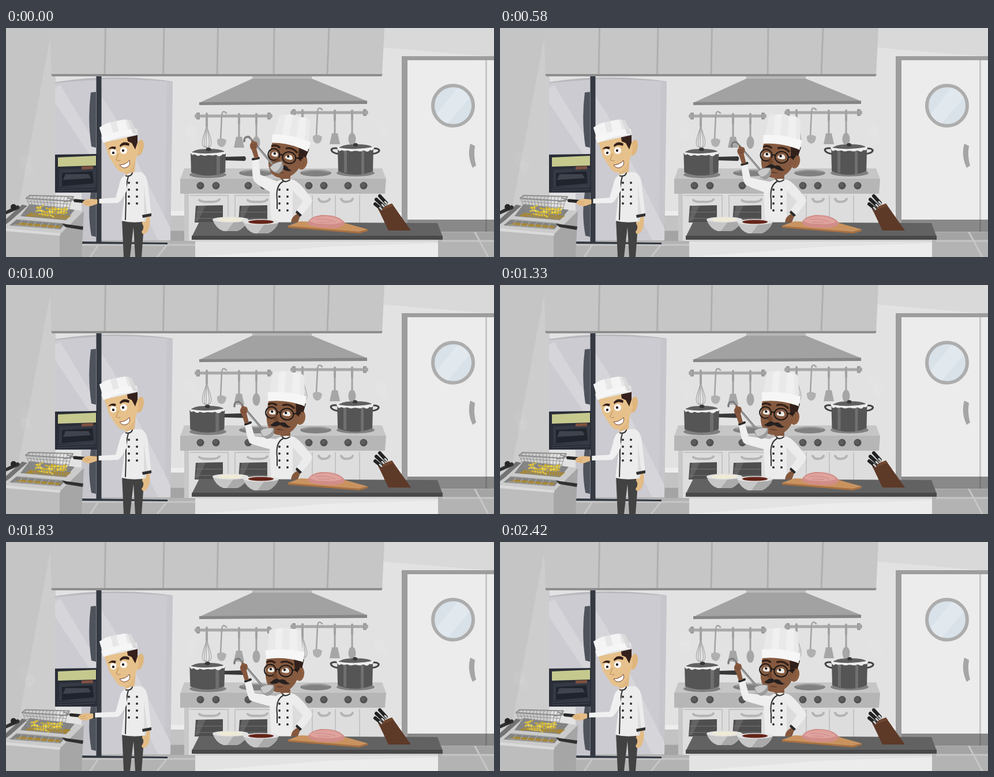
An HTML page for the animation above (2510 ms loop, 846 by 398 pixels).

```html
<!DOCTYPE html>
<html lang="en">
<head>
<meta charset="utf-8">
<title>Kitchen</title>
<style>
html, body { margin: 0; width: 100%; height: 100%; overflow: hidden; background: #e2e2e2; }
svg { display: block; width: 100%; height: 100%; }
.line { fill: none; stroke-linecap: round; stroke-linejoin: round; }
</style>
</head>
<body>
<svg viewBox="0 0 846 398" preserveAspectRatio="none">
  <!-- walls and floor -->
  <path fill="#e2e2e2" d="M0 0H846V398H0z"/>
  <path fill="#d9d9d9" d="M640 0H846V50L655 34z"/>
  <path fill="#c5c5c5" d="M0 0H86V330H0z"/>
  <path fill="#cdcdcd" d="M76 20L86 84V330H18z"/>
  <path fill="#ededed" d="M286 318H309V326H286zM655 320H688V332H655z"/>
  <path fill="#b3b3b3" d="M0 372H130L284 326H312V354H846V398H0z"/>
  <path fill="#c3c3c3" d="M286 326H309V352H286zM655 332H688V354H655z"/>
  <path fill="#a4a4a4" d="M284 353H312V370H284zM748 355H846V369H757z"/>
  <g class="line" stroke="#c6c6c6" stroke-width="3">
    <path d="M813 355L836 398M757 370H846M130 377H328M279 377L262 398M160 377L146 398"/>
  </g>

  <!-- door -->
  <path fill="#9d9d9d" d="M686 49H846V354H686z"/>
  <path fill="#ececec" d="M696 56H846V333H696z"/>
  <path fill="#898989" d="M696 333H846V354H696z"/>
  <path fill="#c7c7c7" d="M831 56H834V333H831z"/>
  <path fill="#777" d="M831 333H834V354H831z"/>
  <circle cx="775" cy="135" r="35" fill="#d9e2e9" stroke="#adadad" stroke-width="6"/>
  <path fill="#e1e8ee" d="M747 148L783 104Q797 108 804 121L766 166Q750 160 747 148z"/>
  <path fill="#a5a5a5" d="M805 201L813 205Q810 222 815 239L809 243Q799 222 805 201z"/>

  <!-- fridge -->
  <path fill="#b9b9be" d="M85 94Q185 78 289 93L284 110H85z"/>
  <path fill="#cccbd1" d="M85 96Q120 92 158 90V373H131V287H85z"/>
  <path fill="#cccbd1" d="M165 89Q230 88 289 94L285 369H165z"/>
  <path fill="#c7c6cc" d="M279 94L289 94L285 369H275z"/>
  <path fill="#d6d5da" d="M85 104L94 99L158 205V240L85 130zM165 118L186 150L285 348V369H264L165 171z"/>
  <path fill="#c6c5cc" d="M131 287H158V373H131z"/>
  <path fill="#343942" d="M156.500 84H165.500V374H156.500zM131 371L280 373V376L131 375z"/>
  <path fill="#4e535c" d="M147 112L156 111V208L148 206Q141 158 147 112zM147 286L156 285V363L148 361Q141 322 147 286z"/>
  <path fill="#2a2e38" d="M85 220L158 219V286H85z"/>
  <path fill="#c6c98e" d="M90 225L156 222V239L90 241z"/>
  <path fill="#343944" d="M92 246L156 243V276H92z"/>
  <path fill="#20242c" d="M97 252L150 249L152 270L97 275z"/>
  <path fill="#3f444f" d="M103 254H143L147 261L99 264z"/>
  <path fill="#81513f" d="M131 241L151 240V245L131 246z"/>
  <path class="line" stroke="#424752" d="M90 279L154 276M90 283L154 280"/>

  <!-- cabinets and hood -->
  <path fill="#c6c6c6" d="M76 0H656L652 82H79z"/>
  <path class="line" stroke="#afafaf" stroke-width="3" d="M172.500 0L171 81M274 0L272.500 81M367.500 0L366 81M465 0L464 81M560 0L557 81"/>
  <path fill="#8e8e8e" d="M78 80H653L651 84H80z"/>
  <path fill="#b9b9b9" d="M427 84H530V89H427z"/>
  <path fill="#a2a2a2" d="M427 88H530L626 127L335 130z"/>
  <path fill="#858585" d="M335 129L626 126.500V132L335 134z"/>

  <g id="tools"></g>

  <!-- stove -->
  <path fill="#c6c6c6" d="M309 244H652L659 263H302z"/>
  <path fill="#b6b6b6" d="M302 262H659L657 288H302z"/>
  <path fill="#dddddd" d="M309 288H653V370H309z"/>
  <path fill="#c8c8c8" d="M309 288H317V370H309z"/>
  <path class="line" stroke="#bcbcbc" stroke-width="1.500" d="M319 291H385V370M397 370V291H457M531 291V338M571 291V338M613 291V338"/>
  <path class="line" stroke="#b4b4b4" stroke-width="4" d="M335 299Q339 303 352 302Q367 303 370 298M419 299Q422 303 436 302Q450 303 453 298M542 297Q545 303 551 302Q559 302 561 297M581 297Q584 303 591 302Q599 302 601 297"/>
  <path fill="#4e4e4e" d="M329 309L376 308V338H327zM405 309L453 308V338H403z"/>
  <path fill="#626262" d="M333 309H346L333 336H328zM409 309H422L409 336H404z"/>
  <path class="line" stroke="#777" d="M329 320H376M329 331H376M405 320H453M405 331H453"/>
  <g fill="#808080"><ellipse cx="433" cy="252" rx="29" ry="6"/><ellipse cx="537" cy="252" rx="27" ry="6"/><ellipse cx="350" cy="255" rx="32" ry="6"/><ellipse cx="606" cy="252" rx="33" ry="6"/></g>
  <path class="line" stroke="#9f9f9f" stroke-width="2" d="M410 250Q433 244 456 250M515 250Q537 244 559 250"/>
  <g id="knobs"></g>

  <!-- pots -->
  <g id="pot1">
    <path fill="#383838" d="M378 224L414 223Q418 227 414 231L378 230z"/>
    <path fill="#555" d="M320 216H381L380 251Q350 262 321 251z"/>
    <path fill="#6e6e6e" d="M365 219H371V255L365 256z"/>
    <ellipse cx="350.500" cy="216" rx="31" ry="5" fill="#ededed"/>
    <path fill="#ededed" d="M320 216Q322 223 327 219Q332 225 338 220Q345 224 351 220Q358 223 364 220Q370 226 376 219Q381 221 381 215z"/>
    <path fill="#606060" d="M322 216Q329 210 350 210Q374 210 379 215Q350 221 322 216z"/>
    <ellipse cx="351" cy="211" rx="4.500" ry="3" fill="#383838"/>
  </g>
  <g id="pot2">
    <path class="line" stroke="#444" stroke-width="3" d="M577 219Q564 217 564 211Q568 207 578 210M634 219Q648 217 647 212Q643 208 633 210"/>
    <path fill="#555" d="M575 208H637L636 249Q606 261 576 249z"/>
    <path fill="#707070" d="M586 212H591V252L586 251zM616 212H621V254H616z"/>
    <ellipse cx="606" cy="208" rx="32" ry="5.500" fill="#ededed"/>
    <path fill="#ededed" d="M574 208Q577 217 582 212Q587 215 592 212Q599 217 606 212Q615 217 620 212Q627 218 631 212Q638 214 638 207z"/>
    <path fill="#606060" d="M577 208Q585 202 606 202Q630 202 635 207Q606 213 577 208z"/>
    <ellipse cx="606" cy="203" rx="4" ry="3" fill="#383838"/>
  </g>
  <g id="steam" fill="#fff"></g>

  <!-- tasting chef -->
  <path fill="#7f5339" d="M473 250H492L494 272L480 276z"/>
  <path fill="#ececec" d="M469 267Q483 259 499 264Q512 270 531 299Q530 307 512 326L503 318L515 301L502 288L501 340H460L457 286z"/>
  <path fill="#dcdcdc" d="M497 282L503 289V340H497z"/>
  <path fill="#85583e" d="M505 323Q495 327 494 338H506L510 327z"/>
  <path fill="#292929" d="M504 317L513 325L510 328L502 321z"/>
  <path class="line" stroke="#303030" stroke-width="2" d="M479 264Q484 270 492 264M480 267Q467 274 470 299V314"/>
  <g id="buttons2" fill="#303030"></g>
  <g id="head">
    <ellipse cx="507" cy="227" rx="8.500" ry="13" fill="#8c5e42"/>
    <path fill="#74492f" d="M505 219Q512 222 507 236Q511 230 509 222z"/>
    <path fill="#855a40" d="M449 201H511L505 233Q501 250 486 259Q470 265 459 257Q448 247 448 224z"/>
    <path fill="#32211b" d="M496 202H514L511 218Q506 214 504 226L499 223z"/>
    <path fill="#edebe6" d="M452 222Q455 218 460 219Q464 221 463 226Q457 229 452 226zM476 223Q480 218 486 219Q490 222 489 226Q483 229 476 226z"/>
    <circle cx="457" cy="222" r="2.200" fill="#1e1614"/><circle cx="481" cy="222" r="2.200" fill="#1e1614"/>
    <path class="line" stroke="#33211a" stroke-width="3.500" d="M450 210Q456 206 463 210M475 209Q485 205 494 212"/>
    <g class="line" stroke="#1b1919" stroke-width="2"><ellipse cx="456" cy="224" rx="10" ry="10"/><ellipse cx="483" cy="224" rx="11.500" ry="10"/><path d="M466 223Q469 220 471 223M495 222L506 220"/></g>
    <path fill="#70472f" d="M465 226L460 236Q465 240 470 236z"/>
    <path fill="#262020" d="M456 246Q460 243 463 240Q468 236 473 240Q481 237 485 242Q488 245 492 245Q485 250 473 244Q463 250 456 246z"/>
    <path fill="#5d392a" d="M466 252Q473 250 481 252Q474 254 466 252z"/>
    <path fill="#e9e9e9" d="M451 156Q455 150 465 152Q475 147 486 151Q499 148 506 155L511 192H449z"/>
    <path fill="#f0f0f0" d="M462 152Q468 150 474 150L475 190H463zM486 151L498 150L503 190H488z"/>
    <path fill="#f6f6f6" d="M446 190Q480 183 514 190L512 207Q480 198 448 205z"/>
  </g>
  <path id="sleeve" fill="#efefef"/>
  <path id="cuff" class="line" stroke="#292929" stroke-width="4"/>
  <g id="ladle">
    <path class="line" stroke="#7d7d7d" stroke-width="3.500" d="M396 211Q396 202 404 203L411 211L446 252"/>
    <path class="line" stroke="#c5c5c5" d="M398 207Q403 203 409 210L444 250"/>
    <g id="scoop">
      <path fill="#c9c9c9" stroke="#858585" d="M441 253Q450 246 464 249Q466 265 453 267Q443 264 441 253z"/>
      <path fill="#9c9c9c" d="M464 249Q466 265 453 267Q449 266 446 263Q459 262 464 249z"/>
    </g>
    <path fill="#85583e" d="M414 241L409 226Q403 219 408 213L409 208L412 211L417 212Q421 216 417 223L421 239z"/>
    <path class="line" stroke="#694330" d="M408 218L416 216M409 222L416 220"/>
  </g>

  <!-- island -->
  <path fill="#626262" d="M335 337L748 339L757 363H322z"/>
  <path fill="#494949" d="M322 361H757V368H322z"/>
  <path fill="#e3e3e3" d="M328 368H749V398H328z"/>
  <path fill="#d0d0d0" d="M328 368H749V371H328z"/>
  <path fill="#ececec" d="M328 398L560 380L749 374V398z"/>
  <g id="bowls"></g>
  <path fill="#a87042" d="M489 343L611 354L627 350V353L612 357L489 347z"/>
  <path fill="#c9935f" d="M489 344L510 336L588 339L627 350L611 354z"/>
  <path fill="#d18d88" d="M523 339Q526 328 546 325Q576 324 587 338Q588 346 567 348Q529 348 523 339z"/>
  <path fill="#dfa39e" d="M526 335Q537 326 557 327Q574 328 583 337Q570 343 549 340Q534 341 526 335z"/>
  <path class="line" stroke="#cd8983" d="M537 333Q550 330 571 337M541 337L561 338"/>
  <path fill="#5d3928" d="M645 314L669 305L702 352H663z"/>
  <path fill="#70462f" d="M645 314L669 305L672 309L647 319z"/>
  <g class="line" stroke-linecap="butt">
    <path stroke="#222" stroke-width="6" d="M640 306L650 314M642 298L654 309M648 292L659 304"/>
    <path stroke="#ccc" stroke-width="3" d="M648 312L651 315M652 307L655 310M657 302L660 305"/>
  </g>

  <!-- frying chef -->
  <path fill="#424242" d="M201 332H240L235 398H224L221 346L215 398H204z"/>
  <path fill="#e3bb85" d="M237 329L249 328Q251 344 245 354Q237 362 235 354Q241 347 236 340z"/>
  <path fill="#e0b983" d="M204 238L225 226L222 259L208 261z"/>
  <path fill="#ececec" d="M207 256Q219 249 235 251Q245 256 246 274L252 325L242 327V336Q220 340 200 335L206 287z"/>
  <path fill="#dcdcdc" d="M239 272L245 324L242 336L239 337z"/>
  <path fill="#303030" d="M236 325L252 322V327L237 330z"/>
  <path class="line" stroke="#303030" stroke-width="2" d="M207 257Q217 259 219 252M212 258Q207 276 208 300L207 333"/>
  <g id="buttons1" fill="#303030"></g>
  <ellipse cx="232" cy="208" rx="6.500" ry="14" transform="rotate(12 232 208)" fill="#dfb67d"/>
  <path fill="#e6c18b" d="M169 194L226 180L230 211Q225 236 211 249Q202 255 193 246L179 225z"/>
  <path fill="#35211c" d="M209 184L228 181V199L224 211L218 200L211 197z"/>
  <ellipse cx="186" cy="216" rx="5.500" ry="5.500" fill="#fff"/><ellipse cx="204" cy="213" rx="6" ry="6" fill="#fff"/>
  <circle cx="186" cy="217" r="2.200" fill="#2a1a16"/><circle cx="203" cy="213" r="2.200" fill="#2a1a16"/>
  <path fill="#33201b" d="M177 211Q182 204 191 207L189 211Q183 208 177 211zM197 204Q204 195 214 201L213 205Q204 201 198 207z"/>
  <path class="line" stroke="#c69c67" stroke-width="1.500" d="M195 219L191 229Q194 232 198 230"/>
  <path fill="#fff" stroke="#713c2e" d="M197 238Q207 238 214 230Q217 240 207 243Q201 244 197 238z"/>
  <path fill="#e7e7e7" d="M162 173Q176 164 190 162Q206 157 217 161L228 186L170 199z"/>
  <path fill="#f4f4f4" d="M162 173Q173 165 181 164L188 191L170 199zM191 162L207 159L214 187L198 188z"/>
  <path fill="#f6f6f6" d="M165 190Q195 177 226 175L229 185Q198 186 169 200z"/>
  <path fill="#dadada" d="M217 161L229 185L220 184L211 160z"/>

  <!-- fryer -->
  <path fill="#cbcbcb" d="M0 320L29 306L135 318L94 361L0 352z"/>
  <path fill="#bdbdbd" d="M0 350L94 359V398H0z"/>
  <path fill="#a6a6a6" d="M93 359L135 318L131 398H93z"/>
  <path fill="#dadada" d="M0 348L94 357V361L0 353z"/>
  <path fill="#838383" d="M41 306L119 316L104 334L25 327zM18 333L103 340L94 350L6 343z"/>
  <path fill="#a68736" d="M43 321L113 326L104 333L33 327zM24 338L96 344L91 348L17 342z"/>
  <path fill="#737373" d="M0 332L28 307L37 309L8 335L0 341z"/>
  <path class="line" stroke="#a0a0a0" stroke-width="1.500" d="M20 333L101 340M14 342L93 349M28 334L23 342M40 335L35 343M52 336L47 344M64 337L59 345M76 338L71 346M88 339L83 347"/>
  <path fill="#303030" d="M97 340L134 345L133 351L103 346zM0 318L20 308Q25 309 23 314L0 324z"/>
  <circle cx="13" cy="311" r="5" fill="#272727"/>

  <path id="arm" fill="#f0f0f0"/>
  <g id="basket">
    <g id="fries" class="line" stroke-width="3"></g>
    <g id="wires" class="line" stroke="#8d8d8d"></g>
    <path class="line" stroke="#8d8d8d" stroke-width="2" d="M102 302L118 298M107 295L120 300"/>
    <path class="line" stroke="#282828" stroke-width="5.500" d="M120 300L153 303"/>
    <path fill="#e4bc86" d="M133 302Q138 297 147 297L160 298V305L149 309Q142 311 137 308Q132 307 133 302z"/>
    <path class="line" stroke="#cda26d" d="M134 303L145 302M137 307L145 305"/>
    <path class="line" stroke="#303030" stroke-width="3" d="M160 297V305"/>
  </g>
</svg>
<script>
const LOOP = 2510, STEP = 1000 / 12, LAST = 29;
const el = id => document.getElementById(id);
const fill = (id, html) => { el(id).innerHTML = html; };
const mix = (a, b, p) => a + (b - a) * p;

let seed = 11;
const random = () => (seed = seed * 16807 % 2147483647) / 2147483647;

function tool(kind, x, y) {
  const stem = (d, w) => `<path class="line" stroke="#a2a2a2" stroke-width="${w}" d="${d}"/>`;
  const handle = stem(`M${x} ${y - 4}v42`, 3) + stem(`M${x} ${y - 3}v16`, 4);
  if (kind === 'whisk') {
    const side = r => `M${x} ${y + 16}C${x + r * .3} ${y + 30} ${x + r * 1.8} ${y + 54} ${x} ${y + 55}`;
    return stem(`M${x} ${y - 4}v22`, 4) + [-9, -5, -1, 5, 9].map(r => stem(side(r), 1.1)).join('');
  }
  if (kind === 'ladle') {
    return stem(`M${x + 6} ${y - 5}q-7 -7 -8 4l-2 42`, 2.5) +
      `<path fill="#b0b0b0" d="M${x - 10} ${y + 41}q8 -5 16 1q-1 12 -9 12q-8 -2 -7 -13z"/>`;
  }
  if (kind === 'spatula') {
    return handle + `<path fill="#a6a6a6" d="M${x - 5} ${y + 36}h10l4 19h-18z"/>`;
  }
  return handle + `<ellipse cx="${x}" cy="${y + 46}" rx="6.500" ry="11" fill="#a6a6a6"/>`;
}

function rail(x, y) {
  const kinds = ['whisk', 'ladle', 'spatula', 'spoon'], places = [18, 46, 74, 104];
  return `<path fill="#a8a8a8" d="M${x} ${y - 2.5}h131v5h-131z"/>` +
    [0, 123].map(d => `<rect x="${x + d}" y="${y - 6}" width="6" height="12" rx="1" fill="#999"/>`).join('') +
    [-1, 126].map(d => `<circle cx="${x + d + 2}" cy="${y}" r="4" fill="#a4a4a4"/>`).join('') +
    kinds.map((k, i) => tool(k, x + places[i], y)).join('');
}

function bowl(x, y, food) {
  return `<path fill="#c7c7c7" d="M${x - 31} ${y}Q${x - 25} ${y + 16} ${x - 12} ${y + 20}H${x + 12}Q${x + 26} ${y + 14} ${x + 31} ${y}z"/>` +
    `<path fill="#aaa" d="M${x + 6} ${y + 4}L${x + 31} ${y}Q${x + 26} ${y + 14} ${x + 12} ${y + 20}H${x - 6}z"/>` +
    `<ellipse cx="${x}" cy="${y}" rx="31" ry="5" fill="#e2e2e2"/>` +
    `<ellipse cx="${x}" cy="${y}" rx="22" ry="3.500" fill="${food}"/>`;
}

function buttons(x, y, gap) {
  let out = '';
  for (let i = 0; i < 4; i++)
    for (const d of [0, gap]) out += `<circle cx="${x + d}" cy="${y + i * 12}" r="2"/>`;
  return out;
}

function fries() {
  let out = '';
  for (let i = 0; i < 38; i++) {
    const x = 53 + random() * 44, y = 312 + random() * 14;
    const dx = 5 + random() * 6, dy = random() * 9 - 5;
    out += `<path stroke="${['#e8c932', '#cfae2a', '#f2da4b'][i % 3]}" d="M${x} ${y}l${dx} ${dy}"/>`;
  }
  return out;
}

function wires() {
  const at = (u, v) => [mix(mix(35, 113, u), mix(49, 105, u), v), mix(mix(295, 300, u), mix(327, 331, u), v)].join(' ');
  let d = '';
  for (let i = 0; i <= 13; i++) d += `M${at(i / 13, 0)}L${at(i / 13, 1)}`;
  for (let i = 1; i <= 5; i++) d += `M${at(0, i / 5)}L${at(1, i / 5)}`;
  for (let i = 0; i <= 12; i++) d += `M${42 + i * 6} ${291 + i * .2}l-3 8`;
  return `<path stroke-width=".9" d="${d}"/>` +
    '<path stroke-width="2" d="M35 296L41 291L117 293L113 301z"/>';
}

fill('tools', rail(330, 153) + rail(496, 147));
fill('knobs', [337, 364, 420, 447, 525, 551, 593, 620].map(x =>
  `<circle cx="${x}" cy="274" r="6.500" fill="#505050"/><circle cx="${x - 1}" cy="273" r="4" fill="#5c5c5c"/>`).join(''));
fill('bowls', bowl(389, 333, '#efead5') + bowl(442, 337, '#652419'));
fill('buttons1', buttons(213, 269, 14));
fill('buttons2', buttons(474, 281, 14));
fill('fries', fries());
fill('wires', wires());

const ease = p => p * p * (3 - 2 * p);
const ramp = (t, a, b) => ease(Math.min(1, Math.max(0, (t - a) / (b - a))));
const move = (id, x, y) => el(id).setAttribute('transform', `translate(${x} ${y})`);

// A path whose numbers slide from one pose to the other.
function blend(from, to, p) {
  const goal = to.match(/-?[\d.]+/g);
  let i = 0;
  return from.replace(/-?[\d.]+/g, n => mix(+n, +goal[i++], p).toFixed(2));
}

function steam(i) {
  let out = '';
  [[38, 258], [322, 200], [652, 200]].forEach(([x, y], s) => {
    for (let k = 0; k < 3; k++) {
      const p = (i / 15 + k / 3 + s * .2) % 1;
      out += `<ellipse cx="${x + 5 * Math.sin(p * 5 + k)}" cy="${y - 38 * p}" rx="${6 + 7 * p}" ry="${8 + 6 * p}" opacity="${.07 * Math.sin(Math.PI * p)}"/>`;
    }
  });
  return out;
}

function draw(time) {
  const i = Math.min(LAST, Math.floor((time % LOOP + 4) / STEP));
  const t = i * STEP;

  // Three quick shakes every seven steps.
  const shake = Math.cos(i * 6 * Math.PI / 7 - .2);
  const dx = -4 + 4 * shake;
  move('basket', dx, (1 - shake) * .3);
  move('fries', -1 + shake, .5 - shake * .5);
  el('arm').setAttribute('d', `M207 256Q199 258 196 274L190 295L${160 + dx} 297V305L194 304Q201 300 210 281z`);

  const lower = ramp(t, 380, 710);
  const tilt = 12 - 6 * lower - 6 * ramp(t, 1500, 2150) + 6 * ramp(t, 2190, 2400);
  el('head').setAttribute('transform', `rotate(${tilt} 480 262)`);
  move('ladle', 17 * (1 - lower), -14 * (1 - lower));
  el('scoop').setAttribute('transform', `rotate(${-18 * (1 - lower)} 452 257)`);
  el('sleeve').setAttribute('d', blend(
    'M427 230L438 228L441 255L471 267L464 288Q438 275 430 266Q426 259 427 230z',
    'M414 243L424 239L431 263L470 268L464 287Q432 279 423 275Q418 269 414 243z', lower));
  el('cuff').setAttribute('d', blend('M428 228L438 226', 'M415 242L424 239', lower));

  const boil = Math.cos(2 * Math.PI * (i + .5) / 5) - .8;
  move('pot1', boil * .9, 0);
  move('pot2', boil * .5, 0);
  fill('steam', steam(i));
}

const start = performance.now();
function tick() {
  draw(performance.now() - start);
  requestAnimationFrame(tick);
}
tick();
</script>
</body>
</html>
```
